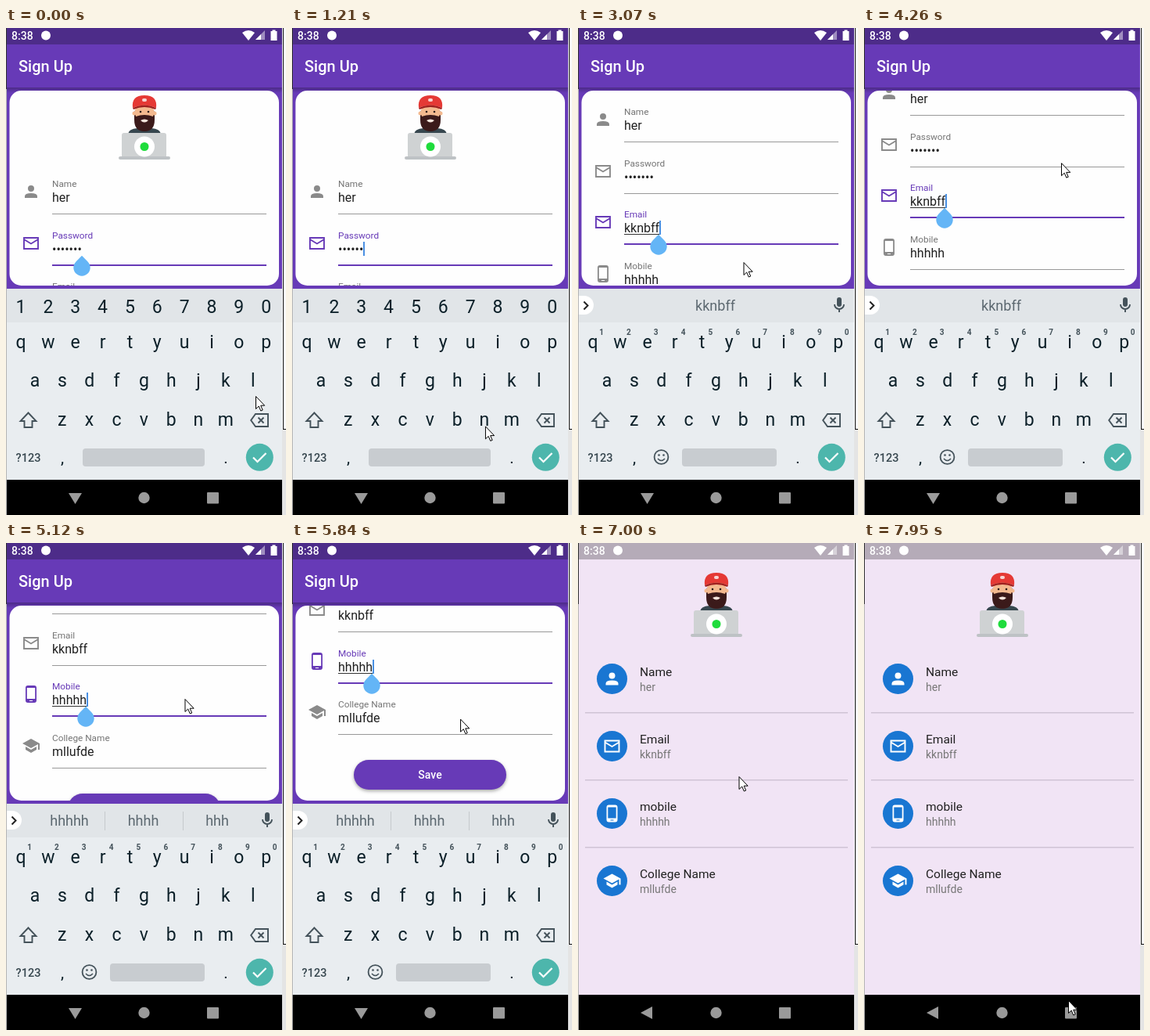
Recreate the animation shown at these times as an HTML page with a canvas. Size 358 px wide and 622 px high, loop 8000 ms.

```html
<!DOCTYPE html>
<html lang="en">
<head>
<meta charset="utf-8">
<title>Sign Up</title>
<style>
html, body { margin: 0; width: 100%; height: 100%; overflow: hidden; background: #fff; }
canvas { display: block; }
</style>
</head>
<body>
<canvas id="stage" width="358" height="622"></canvas>
<script>
const stage = document.getElementById('stage');
const buffer = stage.cloneNode().getContext('2d');
let c = stage.getContext('2d');

const LOOP = 8000, PURPLE = '#673ab7', INK = '#0c2029', SOFT = '#44525a', NAV = '#9a9a9a';
const KEY_W = 34.85, PITCH = 65.5, DIGITS = '1234567890';

// Each icon: filled outline (even-odd), then strokes, in a 24 px box
const icons = {
  person: ['M8 8a4 4 0 1 1 8 0a4 4 0 1 1-8 0M4 20v-2q0-4 8-4t8 4v2Z', ''],
  mail: ['', 'M3 5H21V19H3ZM3 7l9 5.5 9-5.5'],
  phone: ['M8 1h8q3 0 3 3v16q0 3-3 3H8q-3 0-3-3V4q0-3 3-3ZM6.8 4V18H17.2V4ZM10 20h4v1h-4Z', ''],
  school: ['M5 13v4l7 4 7-4v-4l-7 4ZM12 3L1 9l11 6 9-5v7h2V9Z', ''],
  erase: ['', 'M7 4H23V20H7L1.2 12ZM10.5 8.5l7 7m0-7l-7 7'],
  mic: ['M9 5a3 3 0 0 1 6 0v6a3 3 0 0 1-6 0Z', 'M6 11a6 6 0 0 0 12 0M12 17v4'],
  shift: ['', 'M12.5 2.5l10 10.5h-5v8h-10v-8h-5Z']
};
const fields = [
  { label: 'Name', glyph: 'person', value: 'her' },
  { label: 'Password', glyph: 'mail' },
  { label: 'Email', glyph: 'mail', value: 'kknbff', words: ['', 'kknbff', ''] },
  { label: 'Mobile', glyph: 'phone', value: 'hhhhh', words: ['hhhhh', 'hhhh', 'hhh'] },
  { label: 'College Name', glyph: 'school', value: 'mllufde', words: ['I', 'we', 'to'] }
];

// Pointer moves: from, until, x, y; a drag scrolls the form by its own height
const DRAG = true;
const moves = [
  [50, 130, 319, 513], [350, 930, 290, 513], [1150, 1270, 206, 504],
  [1420, 1850, 228, 239], [1990, 2560, 222, 147, DRAG],
  [2570, 2760, 205, 250], [2820, 3020, 211.5, 299],
  [3070, 3400, 275, 381], [3400, 3740, 262, 359],
  [3900, 4030, 254, 206], [4030, 4690, 247, 86, DRAG],
  [4740, 4980, 228.5, 199], [5120, 5500, 227, 156, DRAG],
  [5640, 5850, 215, 225], [5920, 6110, 197, 307],
  [6390, 6450, 205.5, 298], [7210, 7950, 261, 584]
];

function pointerAt(t) {
  let x = 319, y = 470, scroll = 0;
  for (const [from, until, toX, toY, drag] of moves) {
    const k = Math.min(1, Math.max(0, (t - from) / (until - from)));
    const e = k * k * (3 - 2 * k);
    if (drag) scroll += (y - toY) * e;
    x += (toX - x) * e;
    y += (toY - y) * e;
    if (k < 1) break;
  }
  return { x, y, scroll };
}

function text(s, x, y, size, color, align = 'left', weight = 400) {
  c.font = `${weight} ${size}px Roboto, sans-serif`;
  c.fillStyle = color;
  c.textAlign = align;
  c.fillText(s, x, y);
}
function rect(x, y, w, h, color, r = 0) {
  c.fillStyle = color;
  c.beginPath();
  c.roundRect(x, y, w, h, r);
  c.fill();
}
function disc(x, y, r, color) {
  rect(x - r, y - r, 2 * r, 2 * r, color, r);
}
function shape(d, color) {
  c.fillStyle = color;
  c.fill(new Path2D(d), 'evenodd');
}
function line(d, color, width) {
  c.strokeStyle = color;
  c.lineWidth = width;
  c.stroke(new Path2D(d));
}
function moved(x, y, paint) {
  c.save();
  c.translate(x, y);
  paint();
  c.restore();
}
function icon(name, x, y, color) {
  const [fill, strokes] = icons[name];
  moved(x - 12, y - 12, () => {
    shape(fill, color);
    line(strokes, color, 1.9);
  });
}
// Paints a group as one picture with a common opacity
function layer(alpha, dy, paint) {
  const main = c;
  c = buffer;
  c.clearRect(0, 0, 358, 622);
  paint();
  c = main;
  c.globalAlpha = alpha;
  c.drawImage(buffer.canvas, 0, dy);
  c.globalAlpha = 1;
}

function avatar(top) {
  moved(177, Math.round(top), () => {
    shape('M-21 50q1-6 12-7h18q11 1 12 7Z', '#37474f');
    rect(-6, 34, 12, 12, '#e5a27c');
    rect(-12, 10, 24, 28, '#f3b98f', 10);
    shape('M-13 20l2 8q11-4 22 0l2-8v12q0 15-13 15t-13-15Z', '#3b1a1a');
    shape('M-5 33q5-3 10 0q-5 5-10 0Z', '#f6e5dc');
    for (const side of [-1, 1]) {
      disc(13 * side, 24, 2.5, '#f3b98f');
      disc(5 * side, 22, 1.3, '#2b1a1a');
    }
    shape('M-15 17q-2-16 15-16t15 16q-15-7-30 0Z', '#e53935');
    shape('M-15 17q15-7 30 0l-1 2q-14-6-28 0Z', '#9f1f1f');
    rect(-3, 5, 6, 4, '#f7d5d3', 2);
    rect(-29, 49, 57, 32, '#cfd2d3', 3);
    rect(-33, 79, 66, 4, '#bec2c5', 2);
    disc(0, 66.5, 13, '#fff');
    disc(0, 66.5, 5.5, '#1fdc3c');
  });
}

function secret(t) {
  const last = t < 350 || t >= 2770 ? '•' : t < 1270 ? '' : 'b';
  return '•'.repeat(6) + last;
}

function field({ label, glyph, value }, y, on, t) {
  const composing = label === 'Email' || label === 'Mobile';
  const text16 = value || secret(t);
  icon(glyph, 32, y - 28, on ? PURPLE : '#8a8a8a');
  text(label, 59, y - 34.5, 11.8, on ? PURPLE : '#757575');
  text(text16, 59, y - 15, 16, '#212121');
  if (!on) return rect(59, y, 274, 1, '#999');
  rect(59, y - 1, 274, 2, PURPLE);
  const width = c.measureText(text16).width;
  const end = Math.round(59 + width + (label === 'College Name' ? 4 : 0));
  if (composing) rect(59, y - 13, width, 1, '#333');
  if (t >= 350 && t < 6630) rect(end, y - 30, 2, 18, '#4a90e2');
  if (t < 350 || composing) moved(end - (composing ? 1 : 0), y + 3, () => {
    c.rotate(Math.PI / 4);
    rect(-10.7, -10.7, 21.4, 21.4, '#64b5f6', [0, 10.7, 10.7, 10.7]);
  });
}

function form(t, focus, scroll) {
  rect(1, 0, 352, 577, PURPLE);
  const shade = c.createLinearGradient(0, 76, 0, 83);
  shade.addColorStop(0, '#0004');
  shade.addColorStop(1, '#0000');
  rect(1, 76, 352, 7, shade);
  text('Sign Up', 16, 56, 20, '#fff', 'left', 500);
  c.save();
  rect(4.5, 80, 344.5, 249, '#fefefe', 15);
  c.clip();
  avatar(85 - scroll);
  fields.forEach((f, i) => field(f, Math.floor(237.5 + PITCH * i - scroll), i === focus, t));
  const top = Math.round(532 - scroll);
  c.save();
  c.shadowColor = '#0005';
  c.shadowBlur = 4;
  c.shadowOffsetY = 2;
  rect(79, top, 195, 38, PURPLE, 19);
  c.restore();
  text('Save', 176.5, top + 24, 14, '#fff', 'center', 500);
  c.restore();
}

function profile(bottom) {
  rect(1, 0, 352, 577, '#f1e4f5');
  c.save();
  c.beginPath();
  c.rect(1, 0, 352, bottom);
  c.clip();
  avatar(36.5);
  fields.filter(f => f.value).forEach(({ label, glyph, value }, i) => {
    const y = 173.5 + 86 * i;
    disc(43.5, y, 19.5, '#1976d2');
    icon(glyph, 43.5, y, '#fff');
    text(label === 'Mobile' ? 'mobile' : label, 79, y - 3.5, 15.5, '#212121');
    text(value, 79, y + 15.5, 14, '#777');
    if (i < 3) rect(9, y + 42.5, 336, 1.5, '#d0c4d5');
  });
  c.restore();
}

function keyRow(s, x, y) {
  [...s].forEach((k, i) => text(k, x + KEY_W * i, y, 23, INK, 'center'));
}

function keyboard(words) {
  rect(1, 333, 352, 43, '#e1e5e8');
  rect(1, 376, 352, 201, '#e9edf0');
  if (!words) {
    keyRow(DIGITS, 19, 364);
  } else {
    rect(1, 342, 19, 24, '#fff', [0, 12, 12, 0]);
    line('M7.5 349.5l5 5-5 5', '#222', 2);
    words.forEach((w, i) => {
      text(w, 81 + 94.5 * i, 361, 18, '#5c6870', 'center');
      if (i && words[0]) rect(26 + 100 * i, 343, 1, 24, '#c6cacd');
    });
    icon('mic', 334, 354, SOFT);
    [...DIGITS].forEach((d, i) => text(d, 30 + KEY_W * i, 392, 10, SOFT, 'center', 700));
    disc(106.5, 548, 9.8, SOFT);
    disc(106.5, 548, 8, '#e9edf0');
    for (const x of [103.5, 109.5]) disc(x, 545.5, 1.3, SOFT);
    line('M102 550q4.5 5 9 0', SOFT, 1.6);
  }
  keyRow('qwertyuiop', 19, 409);
  keyRow('asdfghjkl', 37, 458);
  keyRow('zxcvbnm', 71.7, 508);
  icon('shift', 28, 501, SOFT);
  icon('erase', 324, 501, SOFT);
  text('?123', 28.5, 553.5, 14.5, '#37474f', 'center', 500);
  text(',', 72, 556, 21, INK, 'center');
  text('.', 281, 556, 21, INK, 'center');
  const left = words ? 133 : 98;
  rect(left, 537, 254 - left, 23, '#c8ccd0', 4);
  disc(324.3, 548.3, 17.5, '#4db6ac');
  line('M316 548.5l5.5 5.5 11-11', '#fff', 2.2);
}

function statusBar() {
  rect(1, 0, 352, 21, '#00000040');
  text('8:38', 7, 14.5, 14, '#fff', 'left', 500);
  disc(51, 9.5, 6, '#fff');
  shape('M302 6q8-6 16 0l-8 10Z', '#fff');
  shape('M331 3v12h-12Z', '#fff7');
  shape('M326 8v7h-7Z', '#fff');
  shape('M338.5 4h2v-1.5h4V4h2v12h-8Z', '#fff');
}

function navBar(back) {
  rect(1, 577, 352, 45, '#000');
  shape(back ? 'M80 600l15-8v16Z' : 'M80 594h17l-8.5 14Z', NAV);
  disc(176.5, 600, 7.2, NAV);
  rect(257, 593, 15, 14.5, NAV, 1);
}

function backdrop() {
  rect(0, 0, 358, 622, '#fff');
  rect(0, 0, 1, 78, '#333');
  rect(0, 78, 1, 544, '#b5b5b5');
  rect(353, 513, 5, 109, '#e4e4e4');
  rect(354, 0, 1, 513, '#111');
  rect(354, 512, 4, 1, '#111');
}

function draw(t) {
  const { x, y, scroll } = pointerAt(t);
  const focus = t < 2790 ? 1 : t < 4960 ? 2 : t < 5870 ? 3 : 4;
  // Page change: the new page fades in upwards while the keyboard sinks
  const p = Math.min(1, Math.max(0, (t - 6776) / 224));
  const rise = Math.round(142 * (1 - p * p) ** 6.6);
  backdrop();
  c.save();
  c.beginPath();
  c.rect(1, 0, 352, 577);
  c.clip();
  form(t, focus, scroll);
  if (p) layer(p ** 1.5, rise, () => profile(333 + 244 * p ** 3 - rise));
  statusBar();
  c.restore();
  navBar(p > 0);
  if (p < 1) layer(1 - p * p, Math.round(50 * p * p), () => keyboard(fields[focus].words));
  moved(x, y, () => {
    const arrow = 'M.5 .5v16l3.7-3.5 2.6 6 2.4-1-2.5-5.8h5Z';
    shape(arrow, '#fff');
    line(arrow, '#000', 1);
  });
}

const start = performance.now();
function tick() {
  draw((performance.now() - start) % LOOP);
  requestAnimationFrame(tick);
}
tick();
</script>
</body>
</html>
```
